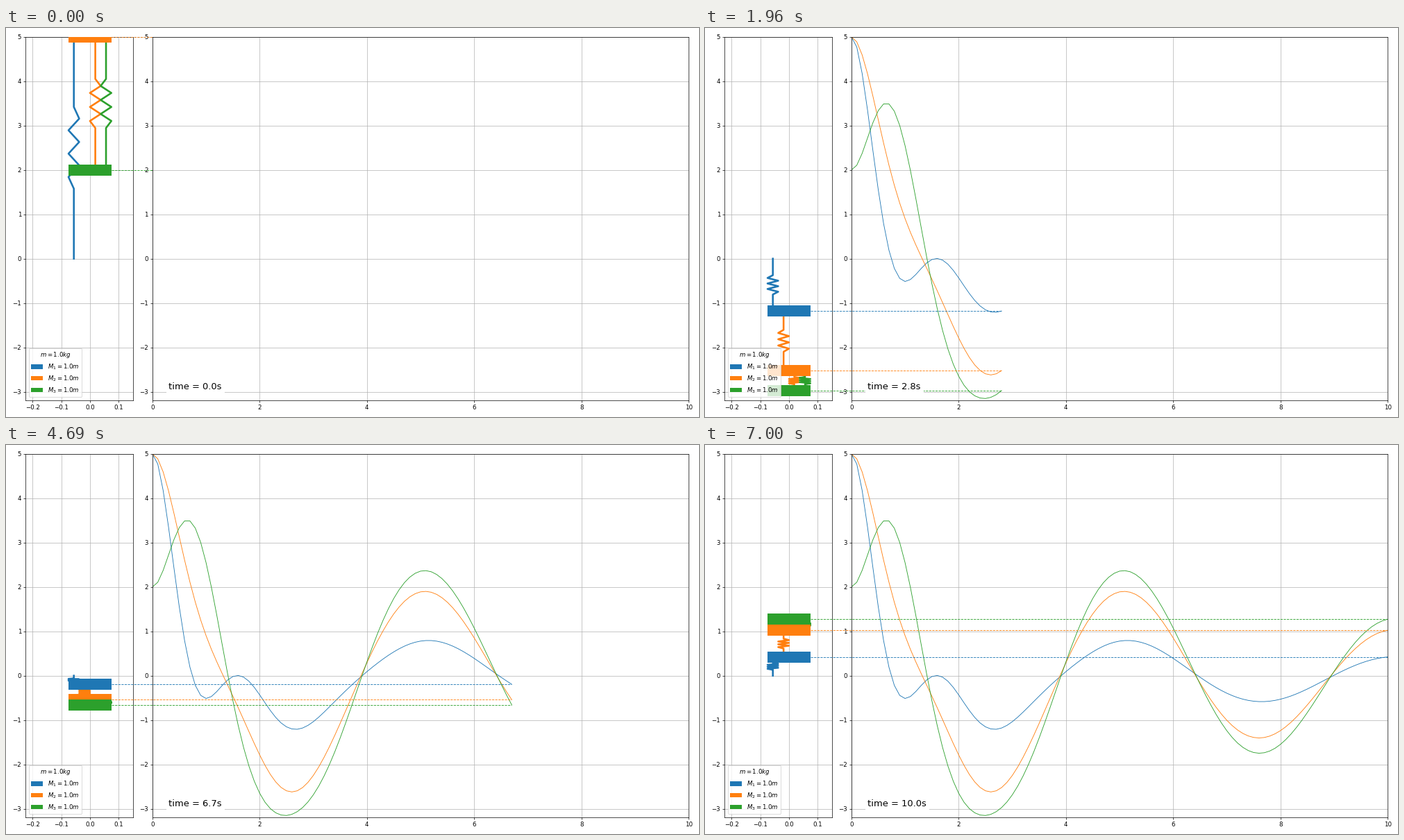
A matplotlib script that plays this animation: 998 by 561 pixels, repeating every 7070 ms.

```python
import numpy as np
import matplotlib.pyplot as plt
from matplotlib.animation import FuncAnimation
from matplotlib.patches import Rectangle

W, H, DPI = 998, 561, 62.5
FRAMES, INTERVAL, DT = 101, 70, 0.1
BLOCK_W, BLOCK_H = 0.15, 0.25
COLORS = ["C0", "C1", "C2"]
START = np.array([5.0, 5.0, 2.0, 0.0, 0.0, 0.0])

# time and height of the three masses at a few moments
MARKS = np.array([
    [0.2, 4.18, 4.60, 2.39],
    [0.4, 2.50, 3.63, 3.06],
    [0.6, 0.81, 2.60, 3.52],
    [0.8, -0.20, 1.67, 3.36],
    [1.0, -0.54, 0.93, 2.58],
    [1.2, -0.41, 0.32, 1.36],
    [1.6, -0.035, -0.74, -1.10],
    [1.9, -0.24, -1.55, -2.39],
    [2.5, -1.11, -2.615, -3.185],
    [2.7, -1.195, -2.61, -3.09],
    [3.6, -0.335, -0.80, -1.07],
    [5.1, 0.79, 1.91, 2.375],
    [5.2, 0.79, 1.895, 2.355],
    [6.7, -0.19, -0.545, -0.66],
    [7.6, -0.575, -1.40, -1.74],
    [7.9, -0.545, -1.31, -1.625],
    [10.0, 0.42, 1.025, 1.27],
])


def chain(a, b, c):
    return np.array([[a + b, -b, 0], [-b, b + c, -c], [0, -c, c]])


def motion(params, t):
    """Heights of three unit masses in a damped chain of springs."""
    system = np.block([[np.zeros((3, 3)), np.eye(3)],
                       [-chain(*params[:3]), -chain(*params[3:])]])
    rates, modes = np.linalg.eig(system)
    share = np.linalg.solve(modes, START.astype(complex))
    return (modes[:3] @ (share[:, None] * np.exp(np.outer(rates, t)))).real.T


def fit(params, steps=60):
    """Refine stiffness and damping by damped least squares."""
    t = MARKS[:, 0]
    weight = np.sqrt(1 + t)[:, None]

    def error(p):
        return ((motion(p, t) - MARKS[:, 1:]) * weight).ravel()

    res, mu, h = error(params), 1e-2, 1e-5
    for _ in range(steps):
        jac = np.column_stack([(error(params + h * e) - res) / h
                               for e in np.eye(6)])
        move = np.linalg.solve(jac.T @ jac + mu * np.eye(6), -jac.T @ res)
        trial = error(params + move)
        if trial @ trial < res @ res:
            params, res, mu = params + move, trial, mu / 4
        else:
            mu *= 5
    return params


def spring(x, start, end):
    """Straight ends with six zigzag points in the middle."""
    xs = np.full(20, x)
    xs[7:13] += BLOCK_W / 8 * np.array([-1, 1] * 3)
    return xs, np.linspace(start, end, 20)


times = np.arange(FRAMES) * DT
heights = motion(fit(np.array([10, 6, 8, 1.85, 0.8, 1.4])), times)

fig, (left, right) = plt.subplots(
    1, 2, figsize=(W / DPI, H / DPI), dpi=DPI,
    gridspec_kw={"width_ratios": [1, 5]})
left.set_xticks([-0.2, -0.1, 0, 0.1])
left.set_xlim(-0.225, 0.15)
right.set_xticks(range(0, 11, 2))
right.set_xlim(0, 10)
for ax in (left, right):
    ax.set_yticks(range(-3, 6))
    ax.set_ylim(-3.1875, 5)
    ax.grid(True)
fig.tight_layout()

# each spring: position, anchor, mass (0 is the fixed origin)
SPRINGS = [(-0.05625, 0, 1), (-0.01875, 1, 2), (0.01875, 3, 2), (0.05625, 2, 3)]
coils = [left.plot([], [], color=COLORS[mass - 1], lw=3)[0]
         for _, _, mass in SPRINGS]
blocks = [left.add_patch(Rectangle((-BLOCK_W / 2, 0), BLOCK_W, BLOCK_H,
                                   facecolor=c, zorder=3,
                                   label=f"$M_{i}=1.0m$"))
          for i, c in enumerate(COLORS, 1)]
left.legend(handles=blocks, title="$m=1.0kg$", loc="lower left")

curves = [right.plot([], [], color=c, lw=1)[0] for c in COLORS]
links = [right.plot([], [], color=c, lw=1, ls="--", clip_on=False)[0]
         for c in COLORS]
clock = right.text(0.03, 0.03, "", fontsize=15, transform=right.transAxes,
                   bbox={"facecolor": "white", "edgecolor": "white"})

# right edge of the blocks, in time units of the right plot
edge_px = left.transData.transform((BLOCK_W / 2, 0))
EDGE = right.transData.inverted().transform(edge_px)[0]


def update(n):
    now = times[n]
    level = [0, *heights[n]]
    for coil, (x, anchor, mass) in zip(coils, SPRINGS):
        coil.set_data(*spring(x, level[anchor], level[mass]))
    for i, y in enumerate(heights[n]):
        blocks[i].set_y(y - BLOCK_H / 2)
        curves[i].set_data(times[:n + 1], heights[:n + 1, i])
        links[i].set_data([EDGE, now], [y, y])
    clock.set_text(f"time = {now:.1f}s")
    return [*coils, *blocks, *curves, *links, clock]


anim = FuncAnimation(fig, update, frames=FRAMES, interval=INTERVAL,
                     repeat=True, repeat_delay=0, blit=False)
plt.show()
```
